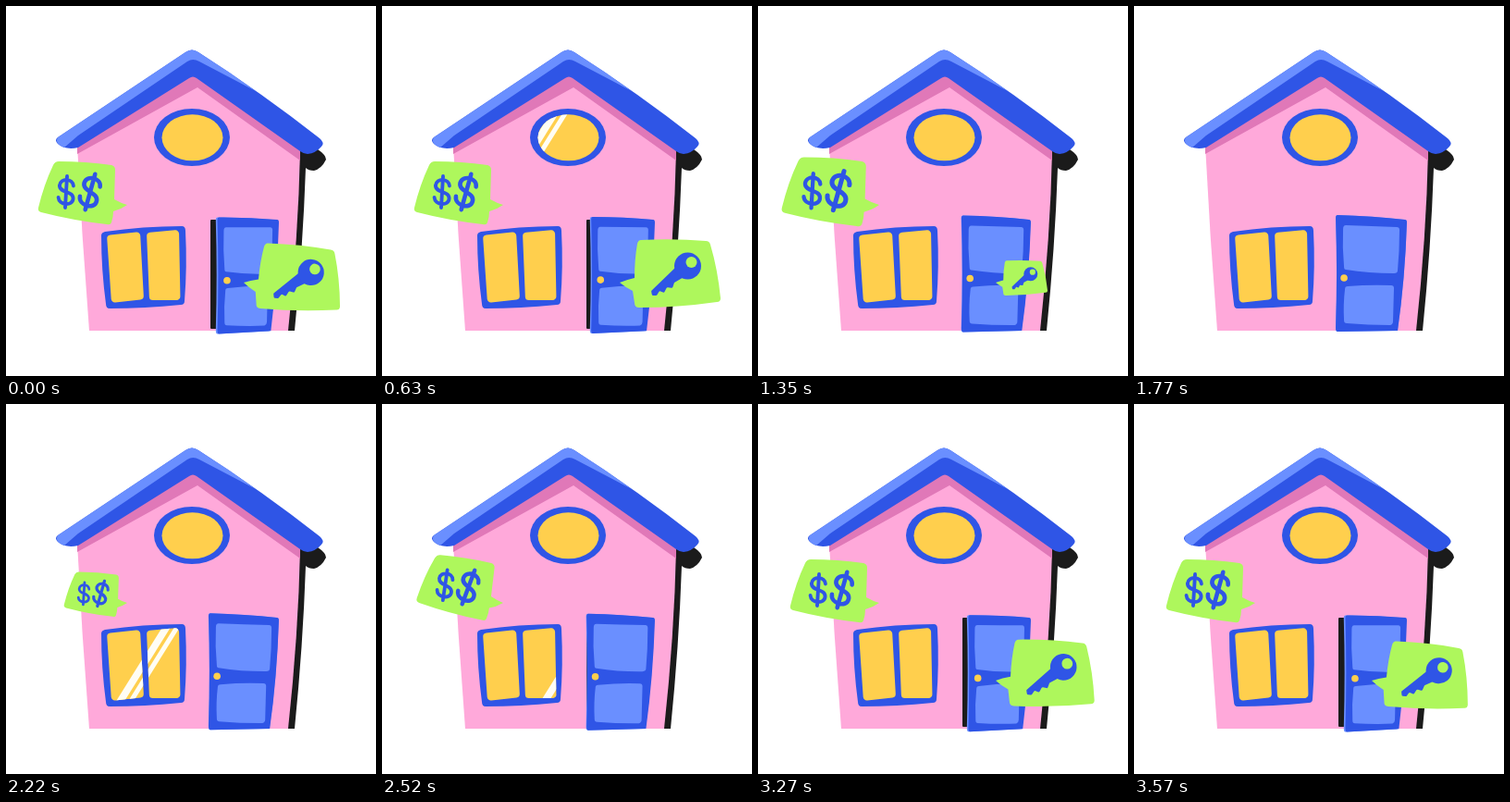
Write an HTML page with a canvas that moves like this. It is 400 px wide and 400 px high and loops after 3600 ms.

```html
<!DOCTYPE html>
<html lang="en">
<head>
<meta charset="utf-8">
<title>House for sale</title>
<style>
html, body { margin: 0; width: 100%; height: 100%; overflow: hidden; background: #fff; }
canvas { display: block; width: 400px; height: 400px; }
</style>
</head>
<body>
<canvas id="stage" width="400" height="400"></canvas>
<script>
const ctx = document.getElementById('stage').getContext('2d');
const LOOP = 3600;
const BLUE = '#2f55e6', LIGHT = '#6a8fff', PINK = '#ffa9da', ROSE = '#e078b8';
const YELLOW = '#ffcf4d', GREEN = '#aef75c', BLACK = '#1b1b1b';

// Closed polygon with rounded corners
function trace(points, radius) {
  const last = points[points.length - 1];
  ctx.beginPath();
  ctx.moveTo((last[0] + points[0][0]) / 2, (last[1] + points[0][1]) / 2);
  points.forEach((p, i) => {
    const next = points[(i + 1) % points.length];
    ctx.arcTo(p[0], p[1], next[0], next[1], radius);
  });
  ctx.closePath();
}

function shape(color, points, radius = 0) {
  trace(points, radius);
  ctx.fillStyle = color;
  ctx.fill();
}

function fillPath(color, d) {
  ctx.fillStyle = color;
  ctx.fill(new Path2D(d));
}

function ellipse(color, x, y, rx, ry = rx) {
  ctx.beginPath();
  ctx.ellipse(x, y, rx, ry, 0, 0, Math.PI * 2);
  ctx.fillStyle = color;
  ctx.fill();
}

const clamp = v => Math.min(1, Math.max(0, v));
const smooth = v => (1 - Math.cos(Math.PI * clamp(v))) / 2;
const backIn = v => 2.70158 * v ** 3 - 1.70158 * v ** 2;

// Two slanted stripes clipped to the current path; x is the trailing one at height y
function glare(x, y) {
  ctx.save();
  ctx.clip();
  for (const [offset, width] of [[0, 9], [11.5, 6]]) {
    const left = x + offset - width / 2;
    shape('#fffdf4', [[left + 40, y - 64], [left + width + 40, y - 64],
      [left + width - 40, y + 64], [left - 40, y + 64]]);
  }
  ctx.restore();
}

function drawHouse() {
  fillPath(BLACK, 'M316 150L337 155Q346 161 346 166Q341 176 333 178Q327 178 324 175Q321 262 312 351H303Z');
  fillPath(PINK, 'M77 150L204 76L318 157Q316 250 305 351H90Q82 250 77 150Z');
  shape(ROSE, [[77, 148], [204, 70], [318, 153], [318, 167], [207, 88], [77, 160]]);
  fillPath(BLUE, 'M56 142L194 50Q201 45 208 50Q278 95 339 143Q345 148 341 152Q335 159 326 160Q322 160 318 157' +
    'L206 78Q202 75 198 78L78 153Q64 156 56 149Q52 145 56 142Z');
  fillPath(LIGHT, 'M56 142L194 50Q201 45 208 50Q240 70 270 92L209 60Q202 56 196 60L78 140L63 153Q52 149 56 142Z');
}

function drawWindows(t) {
  ellipse(BLUE, 201, 142, 41, 31);
  ellipse(YELLOW, 201.5, 142.3, 33, 25);
  glare(169.5 + (t - 630) * 0.175, 143);

  fillPath(BLUE, 'M107 244Q148 238 190 238Q194 238 194 243Q196 282 193 319Q193 323 189 323' +
    'Q150 327 112 327Q108 327 108 322Q103 285 103 248Q103 245 107 244Z');
  const panes = [
    [[109, 248], [145, 244], [149, 317], [114, 321]],
    [[152, 245], [187, 242], [188.5, 318], [155, 318]]
  ];
  for (const pane of panes) {
    shape(YELLOW, pane, 4);
    glare(186 + (t - 2520) * 0.175, 305);
  }
}

function drawDoor(t) {
  const open = (1 + Math.cos(2 * Math.PI * (t - 60) / LOOP)) / 2;
  shape(BLACK, [[221, 231], [240, 231], [240, 349], [221, 349]], 1);
  ctx.save();
  // Narrow towards the right-hand hinge, with the free edge dropping slightly
  const sx = 1 - 0.137 * open, skew = -0.033 * open;
  ctx.transform(sx, skew, 0, 1, 295 * (1 - sx), -295 * skew);
  const panel = 'M220 226Q258 227 293 231Q295 231 295 234Q293 295 285 351L220 352Q218 352 218 348Q220 288 218 229Q218 226 220 226Z';
  ctx.save();
  ctx.translate(-2 * open, 0);
  fillPath(LIGHT, panel);
  ctx.restore();
  fillPath(BLUE, panel);
  fillPath(LIGHT, 'M229 237Q257 238 284 239Q287 239 287 242Q287 265 285 286Q285 289 281 289Q254 289 229 285Q227 285 227 282Q225 261 226 241Q226 237 229 237Z');
  fillPath(LIGHT, 'M231 303Q255 301 278 302Q281 302 281 305L280 341Q280 344 277 345Q253 345 230 343Q227 343 227 340Q226 322 228 306Q228 303 231 303Z');
  ctx.restore();
  ellipse(YELLOW, 227 + 12 * open, 294 + 2.7 * open, 3.8);
}

// Scale and tilt of a speech bubble around the tip of its tail
function bubblePose(t, enter, exit) {
  if (t >= exit && t < enter) {
    const v = (t - exit) / 600;
    return { scale: v < 1 ? 1 - backIn(v) : 0, tilt: 0 };
  }
  const age = t >= enter ? t - enter : t + LOOP - enter;
  const swing = age < 450 ? smooth(age / 450) : 1 - smooth((age - 450) / 550);
  const growth = 1 - (1 - clamp(age / 180)) ** 3;
  return { scale: growth * (1 - 0.03 * swing), tilt: 5.5 * swing };
}

function inBubble(x, y, pose, draw) {
  if (pose.scale <= 0) return;
  ctx.save();
  ctx.translate(x, y);
  ctx.rotate(pose.tilt * Math.PI / 180);
  ctx.scale(pose.scale, pose.scale);
  ctx.translate(-x, -y);
  draw();
  ctx.restore();
}

function dollar(x, y, size, tilt, weight) {
  ctx.save();
  ctx.translate(x, y);
  ctx.rotate(tilt);
  ctx.scale(size, size);
  ctx.strokeStyle = BLUE;
  ctx.lineWidth = weight / size;
  ctx.lineCap = ctx.lineJoin = 'round';
  ctx.stroke(new Path2D('M7.5 -7C6.5 -15 -7 -15 -7.5 -6.5C-7 2 8 -2 8 7C8 15 -7 15 -8 6.5M0 -17V17'));
  ctx.restore();
}

function drawMoney() {
  fillPath(GREEN, 'M57 168Q86 168 114 172Q118 173 118 177L117 209Q124 213 131 215Q124 220 116 222' +
    'Q116 228 114 234Q113 237 109 236Q73 232 38 223Q34 222 35 218Q41 193 51 172Q53 168 57 168Z');
  dollar(65, 201, 1, 0.06, 3.9);
  dollar(91, 201, 1.17, 0.27, 4.6);
}

function drawKey() {
  fillPath(GREEN, 'M280 253Q316 251 350 254Q354 254 355 258Q363 285 366 316Q366 320 362 320' +
    'Q320 326 278 326Q273 326 273 321L271 308Q263 304 257 299Q264 296 273 294Q273 274 276 257Q277 253 280 253Z');
  shape(BLUE, [[318, 282], [291, 308], [292, 313], [297, 313], [300, 308], [305, 310],
    [308, 304], [314, 305], [316, 299], [328, 292]], 1.5);
  ellipse(BLUE, 330.5, 281, 14.5);
  ellipse(GREEN, 334.5, 277, 6);
}

function render(now) {
  const t = now % LOOP;
  ctx.clearRect(0, 0, 400, 400);
  drawHouse();
  drawWindows(t);
  drawDoor(t);
  inBubble(131, 215, bubblePose(t, 2160, 1070), drawMoney);
  inBubble(257, 299, bubblePose(t, 3060, 830), drawKey);
}

const start = performance.now();
function tick() {
  render(performance.now() - start);
  requestAnimationFrame(tick);
}
tick();
</script>
</body>
</html>
```
